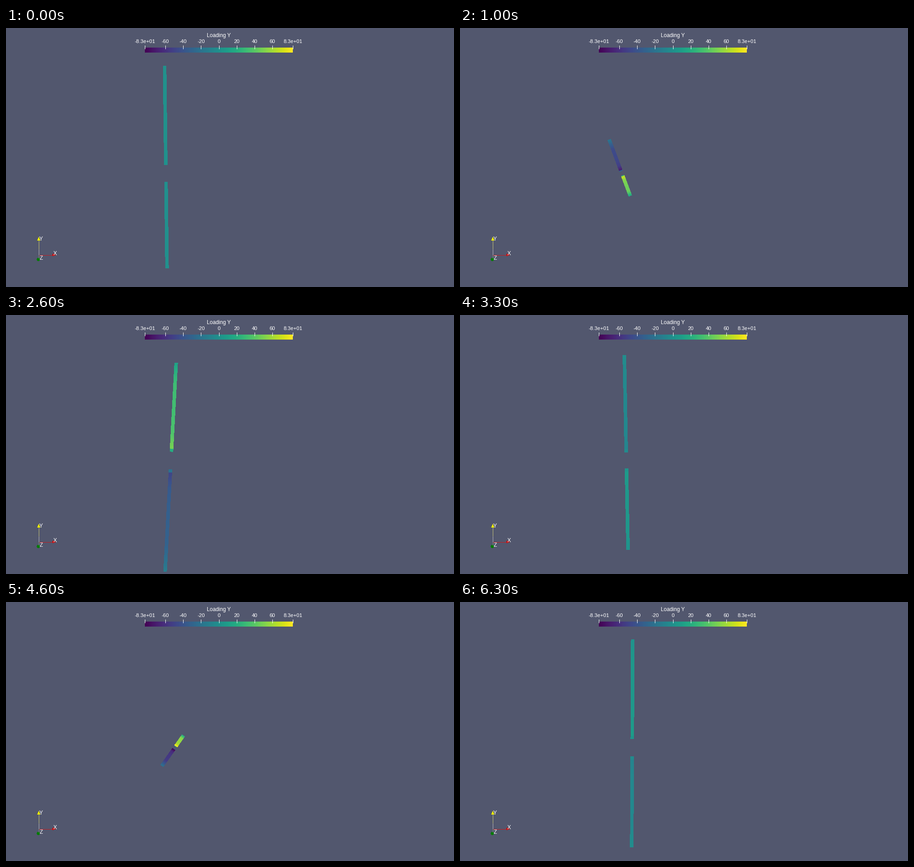
Write a matplotlib script that moves like this. It is 984x569 px and loops after 6.4 s.

```python
import numpy as np
import matplotlib.pyplot as plt
from matplotlib.animation import FuncAnimation
from matplotlib.collections import PolyCollection
from matplotlib.colors import Normalize
from matplotlib.patches import Circle, Polygon

W, H, DPI = 984, 569, 64
FRAMES, INTERVAL = 64, 100
PX = 72 / DPI  # points per pixel

plt.rcParams["font.family"] = "Liberation Sans"
fig = plt.figure(figsize=(W / DPI, H / DPI), dpi=DPI, facecolor="#52576e")
ax = fig.add_axes([0, 0, 1, 1])
ax.axis("off")


def label(x, y, text, size=11.6):
    ax.text(x, y, text, color="white", fontsize=size * PX, ha="center", va="baseline")


def line(x, y, color):
    ax.plot(x, y, color=color, lw=PX, solid_capstyle="butt")


# Colour bar
LIMIT = 83
BAR_LEFT, BAR_RIGHT = 305, 630
ax.imshow(np.linspace(0, 1, 256)[None, :], cmap="viridis", aspect="auto",
          interpolation="nearest", extent=(BAR_LEFT, BAR_RIGHT, 54, 43))
label(467, 19.5, "Loading Y", 11.8)
for value in (-LIMIT, -60, -40, -20, 0, 20, 40, 60, LIMIT):
    x = BAR_LEFT + (value + LIMIT) / (2 * LIMIT) * (BAR_RIGHT - BAR_LEFT)
    line([x, x], [38, 45.5], "white")
    text = f"{value:.1e}" if abs(value) == LIMIT else str(value)
    label(x, 33, text, 11.4)

# Orientation axes
line([71.5, 71.5], [499, 486], "#b4b4bc")
line([71.5, 71.5], [486, 467], "#c4c07a")
line([71.5, 103], [498.5, 498.5], "#c01c20")
line([71.5, 71.5], [499, 506], "#7d8f80")
ax.add_patch(Polygon([(68.5, 467), (75.5, 467), (72, 458.5)], color="#f5f500", lw=0))
ax.add_patch(Polygon([(102, 495.5), (102, 501.5), (110.5, 498.5)], color="#cc0a0a", lw=0))
ax.add_patch(Circle((71, 508.5), 3.6, color="#067a06", lw=0))
label(77, 467, "Y", 12)
label(108, 499, "X", 12)
label(77, 508.5, "Z", 12)

ax.set_xlim(0, W)
ax.set_ylim(H, 0)

# Rotor: two blades seen almost edge-on, with perspective
RADIUS, ROOT, WIDTH = 235.5, 0.086, 6.8
DEPTH, TILT_DEPTH, TILT_X = 0.212, 0.012, 6.5
LOAD, ZERO_ANGLE = 58, 20.5
TURN_TIMES = (0, 10, 19, 33, 35, 42, 46, 55, 63)
TURN_ANGLES = (20.2, 75.5, 125.4, 205.8, 215.8, 254.2, 277.7, 327.9, 374.9)

SEGMENTS = 60
edges = np.linspace(0, 1, SEGMENTS + 1)
centres = (edges[:-1] + edges[1:]) / 2
radii = ROOT + (1 - ROOT) * edges
profile = np.interp(centres,
                    (0, 0.033, 0.034, 0.08, 0.2, 0.4, 0.75, 0.88, 1),
                    (0.62, 0.62, 1.46, 1.4, 1.1, 1.0, 0.95, 0.7, 0.38))

blades = [PolyCollection([], cmap="viridis", norm=Normalize(-LIMIT, LIMIT),
                         linewidths=0, edgecolors="none", antialiaseds=False)
          for _ in range(2)]
for blade in blades:
    ax.add_collection(blade, autolim=False)


def blade_points(frame, angle, side):
    c, s = np.cos(angle), np.sin(angle)
    r = side * radii
    scale = 1 / (1 - r * (DEPTH * s - TILT_DEPTH * c))
    swing = 25.3 - 0.08 * frame  # narrows as the hub drifts to mid-view
    x = 351.2 + 0.43 * frame + r * scale * (TILT_X * c - swing * s)
    y = 319.2 + 0.012 * frame - r * scale * RADIUS * c
    return np.column_stack([x, y])


def strip(points):
    """Quads of constant width along a straight row of points."""
    dx, dy = points[-1] - points[0]
    offset = np.array([-dy, dx]) / np.hypot(dx, dy) * WIDTH / 2
    a, b = points + offset, points - offset
    return np.stack([a[:-1], a[1:], b[1:], b[:-1]], axis=1)


def draw(frame):
    degrees = np.interp(frame, TURN_TIMES, TURN_ANGLES)
    load = LOAD * np.sin(np.radians(degrees - ZERO_ANGLE))
    for blade, side in zip(blades, (1, -1)):
        blade.set_verts(strip(blade_points(frame, np.radians(degrees), side)))
        blade.set_array(-side * load * profile)
    return blades


anim = FuncAnimation(fig, draw, frames=FRAMES, interval=INTERVAL,
                     repeat=True, repeat_delay=0, blit=False)
plt.show()
```
